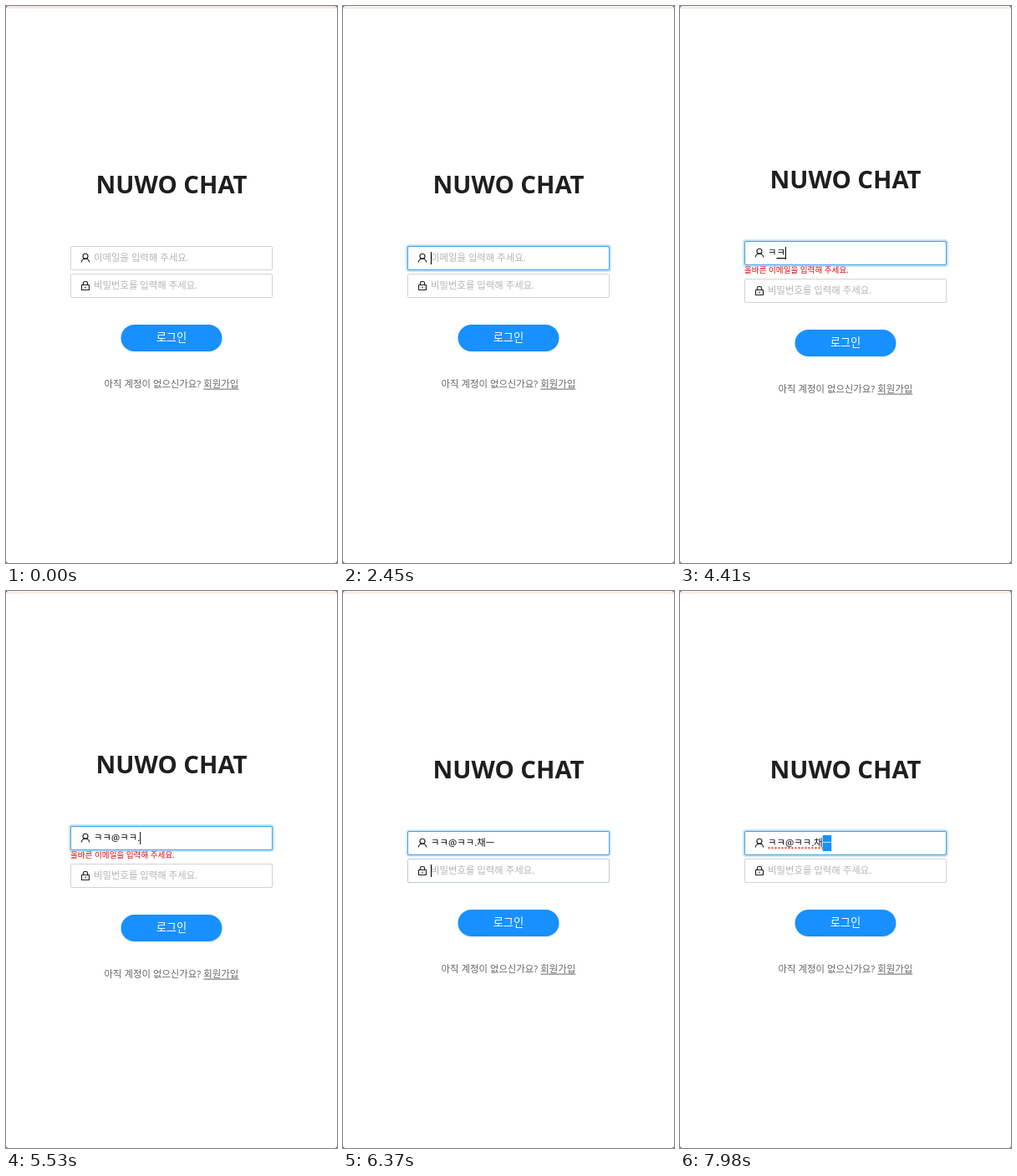
An HTML page that plays this animation: 396 by 666 pixels, repeating every 8000 ms.

```html
<!DOCTYPE html>
<html lang="ko">
<head>
<meta charset="utf-8">
<style>
  html, body { margin: 0; width: 100%; height: 100%; overflow: hidden; background: #fff; }
  svg { display: block; width: 396px; height: 666px; font: 11.4px "Noto Sans", "Noto Sans CJK KR", sans-serif; }
  .middle { text-anchor: middle; }
  .title { font-size: 29.3px; font-weight: 700; fill: #1f1f1f; }
  .hint { fill: #b5b5b5; }
  .icon { fill: none; stroke: #1f1f1f; stroke-width: 1.15; }
  .box { fill: #fff; stroke: #d3d3d3; }
  .active { fill: none; stroke: #40a0e4; }
  .glow { fill: none; stroke: #1890ff; }
</style>
</head>
<body>
<svg viewBox="0 0 396 666">
  <rect width="396" height="666" fill="#fff"/>
  <rect id="bar" width="396" height="2"/>
  <rect id="barEdge" y="2" width="396" height="1"/>
  <path d="M0 0h3Q0 0 0 3zM396 0h-3q3 0 3 3zM0 666h3q-3 0-3-3zM396 666h-3q3 0 3-3z" fill="#555"/>

  <g id="lower">
    <g id="password">
      <rect class="glow" x="77" y="320" width="242" height="29" rx="2"/>
      <rect class="box" x="77.5" y="320.5" width="241" height="28" rx="1.5"/>
      <rect class="active" x="77.5" y="320.5" width="241" height="28" rx="1.5"/>
      <g class="icon">
        <rect x="90.5" y="333.5" width="9" height="6" rx=".6"/>
        <path d="M92.4 333.5v-2.2q0-1.8 1.8-1.8h1.6q1.8 0 1.8 1.8v2.2M95 335.6v1.8"/>
      </g>
      <text class="hint" x="105" y="338.2">비밀번호를 입력해 주세요.</text>
      <rect id="passwordCaret" x="105" y="327" width="1" height="15"/>
    </g>
    <rect x="137.5" y="382.5" width="121" height="32" rx="16" fill="#000" opacity=".045"/>
    <rect x="137.5" y="381" width="121" height="32" rx="16" fill="#1890ff"/>
    <text class="middle" x="198" y="401" font-size="13.3" fill="#fff">로그인</text>
    <g fill="#666">
      <text x="117.6" y="455.7">아직 계정이 없으신가요?</text>
      <text x="236.3" y="455.7">회원가입</text>
      <rect x="236.3" y="457.6" width="42" height="1"/>
    </g>
  </g>

  <g id="upper">
    <text class="middle title" x="198" y="223.6">NUWO CHAT</text>
    <g id="email">
      <rect class="glow" x="77" y="287" width="242" height="29" rx="2"/>
      <rect class="box" x="77.5" y="287.5" width="241" height="28" rx="1.5"/>
      <rect class="active" x="77.5" y="287.5" width="241" height="28" rx="1.5"/>
      <g class="icon">
        <circle cx="95" cy="299.2" r="3"/>
        <path d="M90.3 306.6a4.7 4.4 0 0 1 9.4 0"/>
      </g>
      <text id="emailHint" class="hint" x="105" y="305.2">이메일을 입력해 주세요.</text>
      <rect id="selection" y="292" height="19" fill="#1890ff"/>
      <text x="105" y="305.2" fill="#111"><tspan id="typed"></tspan><tspan id="lastChar"></tspan></text>
      <rect id="composing" y="307" height="1.3" fill="#111"/>
      <line id="spelling" x1="106.5" y1="307.3" y2="307.3" stroke="#e0604f" stroke-width="2.6" stroke-linecap="round" stroke-dasharray="0 4"/>
      <rect id="emailCaret" y="294" width="1" height="15"/>
    </g>
    <text id="error" x="77" y="324.7" font-size="9.6" fill="#e00b0b">올바른 이메일을 입력해 주세요.</text>
  </g>
</svg>
<script>
const LOOP = 8000, STEP = 70, TEXT_X = 105;
const $ = id => document.getElementById(id);
const set = (el, attrs) => { for (const k in attrs) el.setAttribute(k, attrs[k]); };
const show = (id, on) => $(id).setAttribute('visibility', on ? 'visible' : 'hidden');
const within = (t, spans) => spans.some(([from, to]) => t >= from && t < to);

// Each entry: time, full text, whether its last letter is still being composed
const typing = [
  [0, '', false],
  [4200, 'ㅋ', true],
  [4410, 'ㅋㅋ', true],
  [4830, 'ㅋㅋ@', false],
  [5180, 'ㅋㅋ@ㅋ', true],
  [5390, 'ㅋㅋ@ㅋㅋ', true],
  [5530, 'ㅋㅋ@ㅋㅋ.', false],
  [5810, 'ㅋㅋ@ㅋㅋ.ㅊ', true],
  [5880, 'ㅋㅋ@ㅋㅋ.채', true],
  [6020, 'ㅋㅋ@ㅋㅋ.채ㅡ', true],
  [6300, 'ㅋㅋ@ㅋㅋ.채ㅡ', false]
];
const emailCaretTimes = [[1400, 1890], [2450, 2940], [3430, 3990], [4200, 6300], [7630, 7770]];
const passwordCaretTimes = [[6300, 6860], [7350, 7630]];

// 300 ms transition with an in-out curve
function ease(t, start) {
  const p = Math.min(1, Math.max(0, (t - start) / 300));
  return p < .5 ? 4 * p ** 3 : 1 - 4 * (1 - p) ** 3;
}

function paintField(id, border, focus) {
  const field = $(id);
  set(field.querySelector('.active'), { opacity: border });
  set(field.querySelector('.glow'), { 'stroke-width': 4 * focus, 'stroke-opacity': .25 * focus });
}

function draw(t) {
  set($('bar'), { fill: t < 910 ? '#f9e5e0' : '#fef1ec' });
  set($('barEdge'), { fill: t < 910 ? '#f4e6e2' : '#f3e4de' });

  const passwordFocus = ease(t, 6270) - ease(t, 7600);
  paintField('email', ease(t, 1150), ease(t, 1390) - passwordFocus);
  paintField('password', passwordFocus, passwordFocus);

  const invalid = t >= 4200 && t < 5810;
  set($('upper'), { transform: `translate(0 ${invalid ? -6 : 0})` });
  set($('lower'), { transform: `translate(0 ${invalid ? 6 : 0})` });
  show('error', invalid);

  const [, text, composing] = typing.filter(entry => t >= entry[0]).pop();
  const selected = t >= 7770;
  $('typed').textContent = text.slice(0, -1);
  $('lastChar').textContent = text.slice(-1);
  set($('lastChar'), { fill: selected ? '#fff' : '#111' });
  show('emailHint', !text);

  const lastX = TEXT_X + (text.length > 1 ? $('typed').getComputedTextLength() : 0);
  const lastWidth = text ? $('lastChar').getComputedTextLength() : 0;
  for (const id of ['composing', 'selection']) set($(id), { x: lastX, width: lastWidth });
  set($('spelling'), { x2: lastX });
  set($('emailCaret'), { x: lastX + lastWidth });
  show('composing', composing);
  show('selection', selected);
  show('spelling', selected);
  show('emailCaret', within(t, emailCaretTimes));
  show('passwordCaret', within(t, passwordCaretTimes));
}

const begin = performance.now();
function tick() {
  const t = (performance.now() - begin) % LOOP;
  draw(Math.floor(t / STEP) * STEP);
  requestAnimationFrame(tick);
}
tick();
</script>
</body>
</html>
```
